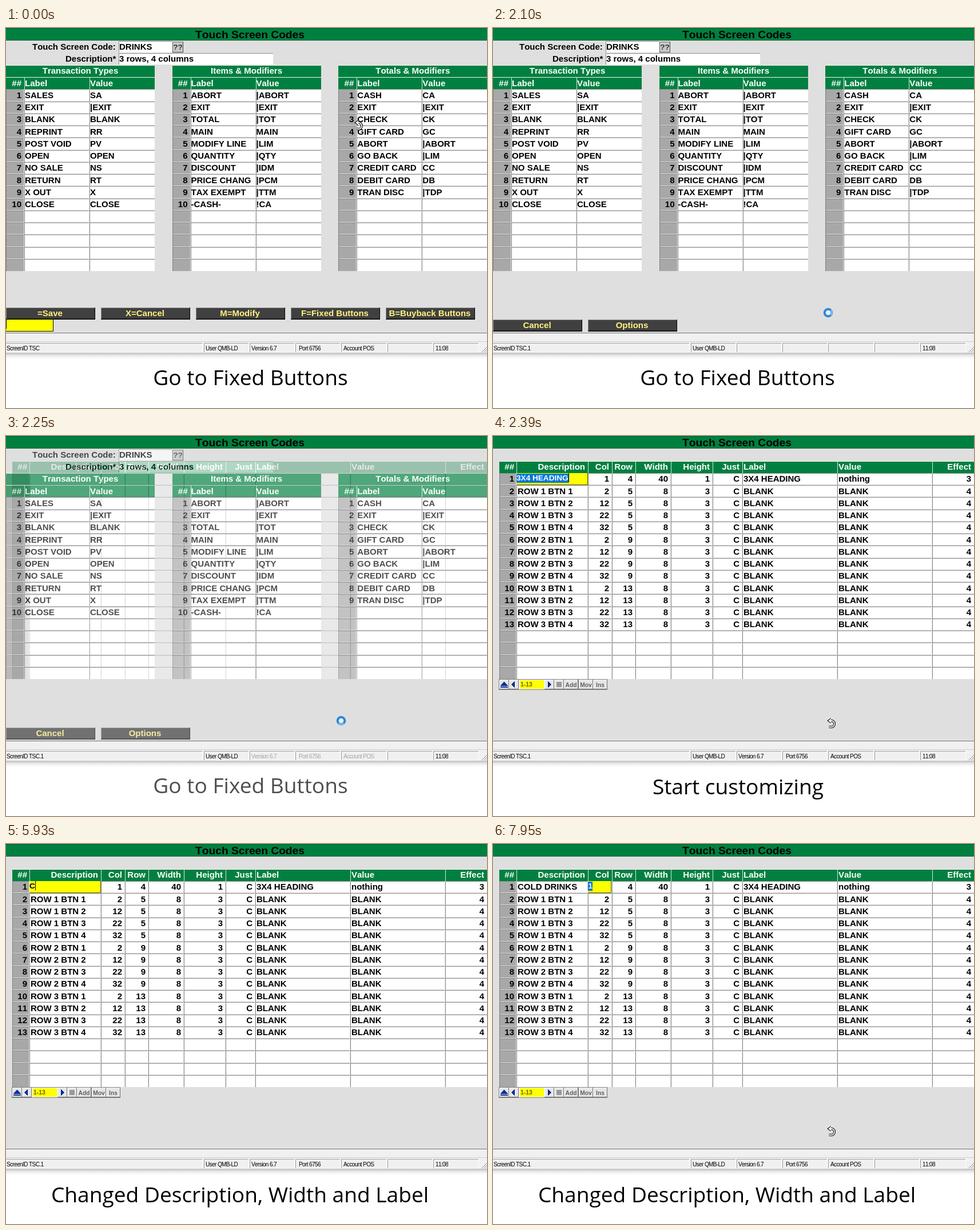
Write an HTML page that moves like this. It is 841 by 666 pixels and loops after 8000 ms.

```html
<!DOCTYPE html>
<html lang="en">
<head>
<meta charset="utf-8">
<title>Touch screen setup</title>
<style>
html, body { margin: 0; width: 100%; height: 100%; overflow: hidden; background: #fff; }
svg { display: block; }
rect { shape-rendering: crispEdges; }
text { font: bold 15px "Liberation Sans", Arial, sans-serif; font-kerning: none; white-space: pre; }
text.title { font-size: 19.2px; }
text.edit { font-size: 13.6px; }
text.nav { font-size: 10.3px; }
text.status { font-weight: normal; font-size: 10px; letter-spacing: -.6px; }
text.cap { font: 37.1px "Open Sans", "Noto Sans", sans-serif; }
</style>
</head>
<body>
<svg id="stage" width="841" height="666" viewBox="0 0 841 666"></svg>
<script>
const GREEN = '#008040', PANEL = '#dfdfdf', GREY = '#a8a8a8', LINE = '#8a8a8a', YELLOW = '#ffff00', BLUE = '#0078d7';
const TYPED = 'COLD DRINKS';
const KEYS = [5930, 6000, 6250, 6330, 6400, 6630, 6780, 6860, 7010, 7090, 7260];

const rect = (x, y, w, h, fill, more = '') => `<rect x="${x}" y="${y}" width="${w}" height="${h}" fill="${fill}" ${more}/>`;
const text = (x, y, s, anchor = 'start', fill = '#000', cls = '', id = '') =>
  `<text x="${x}" y="${y}" text-anchor="${anchor}" fill="${fill}" class="${cls}" ${id && `id="${id}"`}>${s}</text>`;
const group = (id, body) => `<g id="${id}">${body}</g>`;
const rowTop = j => Math.round(64.75 + 21.25 * j);
const baseline = j => 80.3 + 21.25 * j;

// Box with a light top-left and a dark bottom-right edge
const raised = (x, y, w, h, fill, light, dark) =>
  rect(x, y, w, h, dark) + rect(x, y, w - 1, h - 1, light) + rect(x + 1, y + 1, w - 2, h - 2, fill);

function button(x, y, label) {
  return raised(x, y, 156, 21, '#404040', '#8c8c8c', '#000') + rect(x + 1, y + 19, 154, 1, '#222') +
    text(x + 77, y + 15, label, 'middle', '#fff280');
}

// Empty grid with a green heading row above row `first`
function grid(xs, first) {
  const left = xs[0], right = xs[xs.length - 1], top = rowTop(first), head = rowTop(first - 1);
  let out = rect(left, head, right - left, top - head, '#f0f5f1') + rect(left, head + 1, right - left, top - head - 1, GREEN);
  out += rect(left, top, right - left, 426 - top, '#fff') + rect(left, top, xs[1] - left, 426 - top, GREY);
  for (let j = first; j < 17; j++) {
    const y = rowTop(j);
    out += rect(left, y, right - left, 1, LINE);
    if (j > first) out += rect(left, y - 1, right - left, 1, PANEL);
  }
  xs.slice(1, -1).forEach(x => {
    out += rect(x, head, 1, top - head, '#d5eadd') + rect(x, top, 1, 426 - top, LINE) + rect(x - 1, top, 1, 426 - top, PANEL);
  });
  return out + rect(left, top, 1, 426 - top, '#808080');
}

function codeTable(x, title, data) {
  let out = rect(x, 65, 260, 1, '#f0f5f1') + grid([x, x + 32, x + 146, x + 260], 2) + rect(x, 66, 260, 20, GREEN);
  out += text(x + 130, baseline(0), title, 'middle', '#fff') + text(x + 27, baseline(1), '##', 'end', '#fff') +
    text(x + 33, baseline(1), 'Label', 'start', '#fff') + text(x + 147, baseline(1), 'Value', 'start', '#fff');
  data.split(';').forEach((pair, i) => {
    const [label, value] = pair.split(':'), y = baseline(i + 2);
    out += text(x + 27, y, i + 1, 'end') + text(x + 33, y, label) + text(x + 147, y, value);
  });
  return out;
}

function field(x, y, w, value) {
  return rect(x, y, w, 20, '#fff') + rect(x, y, w, 1, LINE) + rect(x, y, 1, 20, LINE) + text(x + 1, y + 15, value);
}

function codesScreen() {
  return text(46, 38, 'Touch Screen Code:') + field(197, 23, 93, 'DRINKS') +
    raised(291, 24, 19, 19, '#c9c9c9', '#777', '#444') + text(300.5, 38, '??', 'middle', '#333', 'edit') +
    text(104, 59, 'Description*') + field(197, 44, 270, '3 rows, 4 columns') +
    codeTable(0, 'Transaction Types', 'SALES:SA;EXIT:|EXIT;BLANK:BLANK;REPRINT:RR;POST VOID:PV;OPEN:OPEN;NO SALE:NS;RETURN:RT;X OUT:X;CLOSE:CLOSE') +
    codeTable(290.5, 'Items &amp; Modifiers', 'ABORT:|ABORT;EXIT:|EXIT;TOTAL:|TOT;MAIN:MAIN;MODIFY LINE:|LIM;QUANTITY:|QTY;DISCOUNT:|IDM;PRICE CHANG:|PCM;TAX EXEMPT:|TTM;-CASH-:!CA') +
    codeTable(581.3, 'Totals &amp; Modifiers', 'CASH:CA;EXIT:|EXIT;CHECK:CK;GIFT CARD:GC;ABORT:|ABORT;GO BACK:|LIM;CREDIT CARD:CC;DEBIT CARD:DB;TRAN DISC:|TDP');
}

function commandBar() {
  const labels = ['=Save', 'X=Cancel', 'M=Modify', 'F=Fixed Buttons', 'B=Buyback Buttons'];
  return labels.map((s, i) => button(i * 166, 490, s)).join('') +
    rect(0, 511, 83, 21, '#000') + rect(0, 511, 82, 20, YELLOW) + rect(0, 511, 1, 16, '#000033', 'id="caretA"');
}

const COLS = [11, 41, 166, 208, 249, 311, 384, 436, 602, 768, 841];
const isLeft = c => c === 7 || c === 8;

function cellText(c, y, s, fill, left) {
  return left ? text(COLS[c] + 2, y, s, 'start', fill) : text(COLS[c + 1] - (c ? 5 : 4), y, s, 'end', fill);
}

function blankScreen() {
  const names = ['##', 'Description', 'Col', 'Row', 'Width', 'Height', 'Just', 'Label', 'Value', 'Effect'];
  return rect(0, 23, 841, 510, PANEL) + grid(COLS, 0) +
    names.map((s, c) => cellText(c, baseline(-1), s, '#fff', isLeft(c))).join('');
}

function buttonRows() {
  const rows = [[TYPED, 1, 4, 40, 1, 'C', '3X4 HEADING', 'nothing', 3]];
  for (let r = 1; r < 4; r++)
    for (let b = 1; b < 5; b++)
      rows.push([`ROW ${r} BTN ${b}`, 10 * b - 8, 4 * r + 1, 8, 3, 'C', 'BLANK', 'BLANK', 4]);
  return rows.map((row, i) => [i + 1, ...row].map((s, c) =>
    cellText(c, baseline(i), s, '#000', c === 1 || isLeft(c))).join('')).join('');
}

function navBar() {
  const cell = (x, w) => raised(x, 427, w, 17, '#e6e6e6', '#f8f8f8', '#707070');
  const tri = d => `<path d="${d}" fill="#0030b8" stroke="#001a60"/>`;
  let out = rect(10, 426, 190, 19, '#808080') + cell(11, 17) + cell(28, 17) + rect(45, 427, 45, 17, '#f4f4f4') +
    rect(47, 428, 42, 15, YELLOW) + cell(90, 17) + cell(107, 17);
  out += tri('M13.5 437.5L19.5 431L25.5 437.5Z') + rect(13, 439, 13, 2, '#0030a0') +
    tri('M37.5 430.5V440.5L32.5 435.5Z') + tri('M96.5 430.5V440.5L101.5 435.5Z') +
    rect(111, 431, 9, 9, '#9a9a9a') + text(48, 439, '1-13', 'start', '#6b6400', 'nav');
  [['Add', 124], ['Mov', 150], ['Ins', 175]].forEach(([s, x]) => {
    out += cell(x, 25) + text(x + 12.5, 440, s, 'middle', '#606060', 'nav');
  });
  return out;
}

const editBox = (x, w) => rect(x, 65, w, 21, '#6b6400') + rect(x, 65, w - 1, 20, YELLOW);

function editors() {
  return group('descEdit', editBox(41, 125) + rect(41, 66, 91, 16, BLUE, 'id="sel"') +
      text(41, 78, '', 'start', '#fff', 'edit', 'typed') + rect(132, 65, 1, 16, '#000033', 'id="caretB"')) +
    group('colEdit', editBox(166, 41) + rect(166, 66, 8, 16, BLUE) + text(166.5, 78, '1', 'start', '#fff', 'edit'));
}

function statusBar() {
  const cells = [[-1, 345], [346, 79], [426, 79], [506, 79], [586, 80], [667, 79], [747, 80]];
  let out = rect(0, 533, 841, 36, '#f0f0f0') + rect(0, 534, 841, 1, '#666') + rect(0, 549, 841, 1, '#d0d0d0');
  cells.forEach(([x, w]) => out += raised(x, 552, w, 17, '#f0f0f0', '#a0a0a0', '#fff'));
  const label = (x, s, id) => text(x, 564.5, s, 'start', '#000', 'status', id);
  out += label(1, '', 'screenId') + label(349, 'User QMB-LD') + label(751, '11:08') +
    group('info', label(429, 'Version 6.7') + label(512, 'Port 6756') + label(590, 'Account POS'));
  return out + '<path d="M832 568L841 559M836 568L841 563M840 568L841 567" stroke="#909090"/>';
}

const HOOK = 'M-4 -4H0A5 5.5 0 0 1 0 7H-4.500M-.500 -7L-4.500 -4L-.500 -1';
const cursors =
  group('hook', `<path d="${HOOK}" fill="none" stroke="#000" stroke-width="4"/><path d="${HOOK}" fill="none" stroke="#fff" stroke-width="1.8"/>`) +
  group('hand', '<path d="M-6 -5Q-6 -8 -3 -6L0 -2L2 -4L4 -2L6 -1L6 4L5 8H-1L-6 2Q-6 0 -3 1Z" fill="#fff" stroke="#000" stroke-width="1.2"/>') +
  group('spin', '<circle r="6.3" fill="#e8f2fa" stroke="#2f86d6" stroke-width="4"/><path id="arc" d="M0 -6.3A6.3 6.3 0 0 1 6.3 0" fill="none" stroke="#79bdf2" stroke-width="3"/>');

document.getElementById('stage').innerHTML =
  '<defs><linearGradient id="shade" x2="0" y2="1"><stop stop-color="#bdbdbd"/><stop offset=".5" stop-color="#ececec"/><stop offset="1" stop-color="#fff"/></linearGradient></defs>' +
  rect(0, 0, 841, 666, '#fff') + rect(0, 569, 841, 11, 'url(#shade)') + rect(0, 0, 841, 534, PANEL) +
  rect(0, 0, 841, 22, GREEN) + rect(0, 0, 841, 1, '#006030') + rect(0, 21, 841, 1, '#006030') +
  text(426.5, 18, 'Touch Screen Codes', 'middle', '#000', 'title') +
  group('codes', codesScreen()) + group('optionBar', button(0, 511, 'Cancel') + button(166, 511, 'Options')) +
  group('commands', commandBar()) + group('blank', blankScreen()) +
  group('filled', buttonRows() + navBar() + editors()) + statusBar() + cursors +
  text(427.5, 626, 'Go to Fixed Buttons', 'middle', '#000', 'cap', 'cap1') +
  text(428.5, 628, 'Start customizing', 'middle', '#000', 'cap', 'cap2') +
  text(409, 627.5, 'Changed Description, Width and Label', 'middle', '#000', 'cap', 'cap3');

const el = {};
document.querySelectorAll('[id]').forEach(e => el[e.id] = e);
const clamp = v => Math.max(0, Math.min(1, v));
const ease = v => v * v * (3 - 2 * v);
const fade = (id, v) => {
  el[id].style.opacity = v;
  el[id].style.visibility = v > 0 ? 'visible' : 'hidden';
};
const put = (id, x, y) => el[id].setAttribute('transform', `translate(${x} ${y})`);

// Mouse travels down in steps, runs past the button and comes back
function pointer(t) {
  if (t < 1180) return [617, 170];
  if (t >= 2390) return [592, 503];
  const k = Math.min(8, Math.floor((t - 1180) / 77) + 1);
  const y = k <= 6 ? 170 + 384 * ease(k / 6) : 554 - 51 * ease((k - 6) / 2);
  return [617 - 25 * ease(k / 8), y];
}

function crossfade(t) {
  if (t < 2180) return 0;
  if (t < 2260) return .31;
  if (t < 2330) return .67;
  return 1;
}

function draw(t) {
  const mix = crossfade(t), ready = t >= 2390;
  fade('commands', t < 2020 ? 1 : t < 2100 ? .5 : 0);
  fade('optionBar', t < 2020 ? 0 : 1);
  fade('blank', mix);
  fade('filled', ready ? 1 : 0);
  fade('info', t < 2020 ? 1 : t < 2100 ? .5 : mix);
  el.screenId.textContent = t < 2020 ? 'ScreenID TSC' : 'ScreenID TSC.1';
  fade('caretA', t < 460 || (t >= 1010 && t < 1540) ? 1 : 0);

  fade('cap1', ready ? 0 : 1 - mix);
  fade('cap2', t >= 5930 ? 0 : ready ? 1 : clamp((mix - .5) * 1.4));
  fade('cap3', t >= 5930 ? 1 : 0);

  const count = KEYS.filter(k => t >= k).length;
  const commit = t < 7720 ? 0 : t < 7870 ? .33 : t < 7950 ? .67 : 1;
  el.typed.textContent = count ? TYPED.slice(0, count) : '3X4 HEADING';
  el.typed.setAttribute('fill', count ? '#000' : '#fff');
  fade('descEdit', 1 - commit);
  fade('colEdit', commit);
  fade('sel', ready && !count ? 1 : 0);
  const blinkOff = (t >= 4370 && t < 4830) || (t >= 5380 && t < 5930);
  fade('caretB', ready && !blinkOff && commit < 1 ? 1 : 0);
  el.caretB.setAttribute('x', count ? Math.round(41 + el.typed.getComputedTextLength()) : 132);

  const [x, y] = pointer(t), busy = t >= 1950 && !ready;
  const overButton = t >= 1180 && !busy && !ready && y > 488 && y < 513;
  put('hook', x, y);
  put('hand', x, y);
  put('spin', 586, 499);
  el.arc.setAttribute('transform', `rotate(${Math.floor((t - 1950) / 77) * 45})`);
  fade('hand', overButton ? 1 : 0);
  fade('spin', busy ? 1 : 0);
  fade('hook', busy || overButton ? 0 : t >= 5930 ? commit : 1);
}

function tick() {
  draw(performance.now() % 8000);
  requestAnimationFrame(tick);
}
tick();
</script>
</body>
</html>
```
